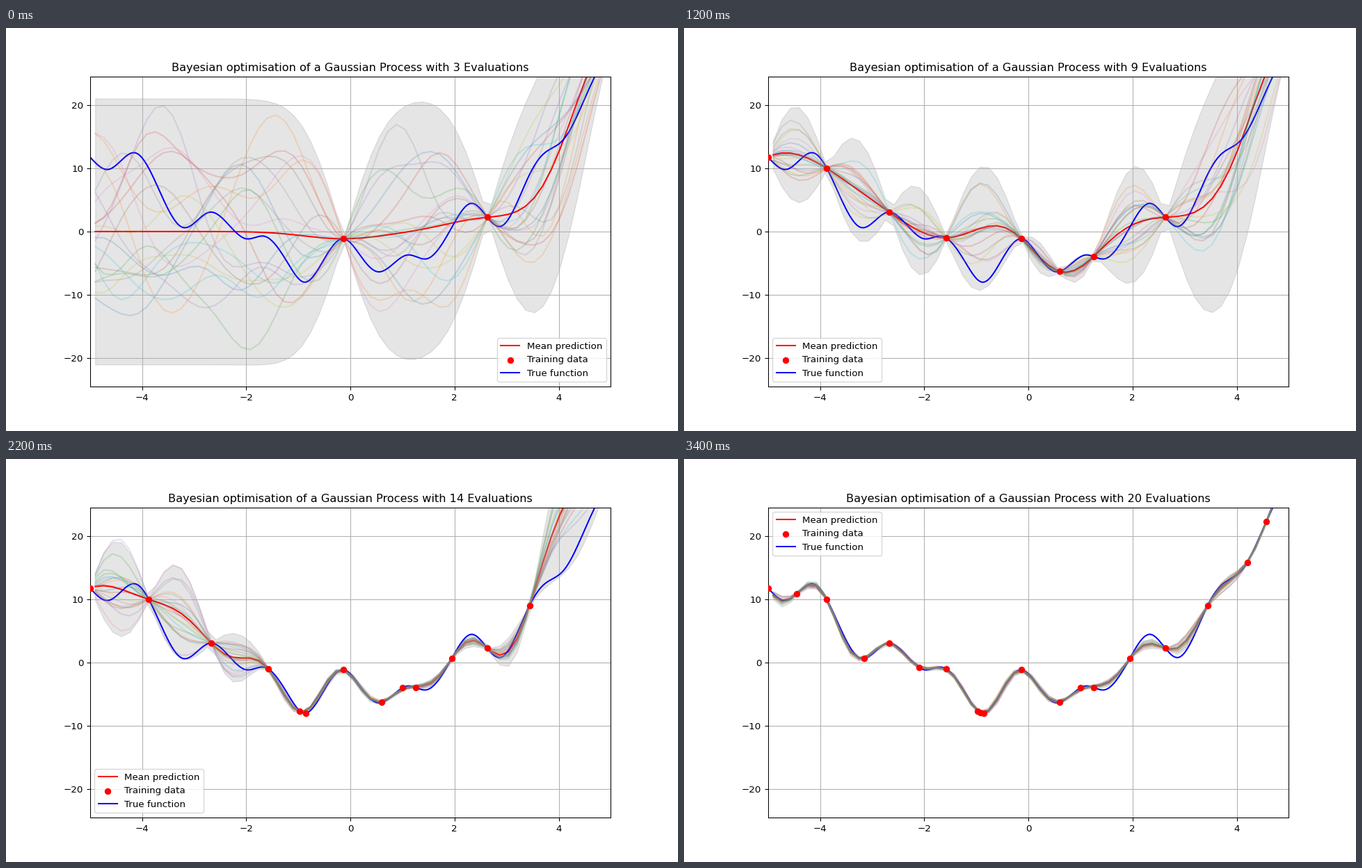
Recreate the animation shown at these times as a matplotlib script. Size 966 by 580 pixels, loop 3.6 s.

```python
import numpy as np
import matplotlib.pyplot as plt
from matplotlib.animation import FuncAnimation

WIDTH, HEIGHT, DPI = 966, 580, 96.6
FIRST, LAST = 3, 20
N_SAMPLES = 20

# Gaussian process settings
LENGTH_SCALE = 0.75
SIGMA = 7.5
NOISE = 0.1
BAND = 2.8

# Evaluation points in the order in which they are chosen
EVALS = np.array([-0.13, 2.63, 5, -1.58, -3.87, 1.25, -5, -2.67, 0.6, -0.97,
                  3.44, -0.86, 1.0, 1.95, -0.92, 4.2, -4.45, -3.16, -2.1, 4.57])

# Turning points of the true function and a few points between them
KEYS = np.array([
    (-5, 11.75), (-4.65, 9.8), (-4.12, 12.4), (-3.67, 6.5), (-3.22, 0.65),
    (-2.7, 3.05), (-2, -1.15), (-1.65, -0.75), (-1.2, -5), (-0.88, -8),
    (-0.5, -4.3), (-0.13, -1.15), (0.2, -3.9), (0.52, -6.35), (1.1, -3.7),
    (1.47, -4.3), (1.95, 0.7), (2.33, 4.45), (2.88, 0.8), (3.44, 9),
    (3.7, 12.2), (4.1, 14.6), (4.57, 22.3), (5, 29.5)])


def natural_spline(keys):
    """Natural cubic spline as a sum of |x - key|^3 plus a line."""
    kx, ky = keys.T
    line = np.column_stack([np.ones_like(kx), kx])
    system = np.block([[np.abs(kx[:, None] - kx) ** 3, line],
                       [line.T, np.zeros((2, 2))]])
    coef = np.linalg.solve(system, np.append(ky, [0, 0]))

    def evaluate(x):
        cubes = np.abs(x[:, None] - kx) ** 3
        return cubes @ coef[:-2] + coef[-2] + coef[-1] * x

    return evaluate


def kernel(a, b):
    return SIGMA ** 2 * np.exp(-0.5 * ((a[:, None] - b) / LENGTH_SCALE) ** 2)


def posterior(pts, values, x):
    """Mean and covariance at x, given the evaluated points."""
    gram = kernel(pts, pts) + NOISE ** 2 * np.eye(len(pts))
    cross = kernel(x, pts)
    weights = np.linalg.solve(gram, cross.T)
    return weights.T @ values, kernel(x, x) - cross @ weights


def sample_paths(mean, cov, seed):
    rng = np.random.default_rng(seed)
    scale, basis = np.linalg.eigh(cov)
    root = basis * np.sqrt(np.maximum(scale, 0))
    paths = rng.normal(size=(N_SAMPLES, len(mean))) @ root.T
    return mean + paths - paths.mean(axis=0)


def legend_place(n):
    if n <= 7:
        return "lower right"
    return "lower left" if n <= 16 else "upper left"


true_f = natural_spline(KEYS)
x_true = np.linspace(-5, 5, 500)
x_fit = np.linspace(-4.9, 4.85, 60)

# The small margin guards against rounding down by a pixel
size = np.array([WIDTH, HEIGHT]) / DPI + 1e-6
fig, ax = plt.subplots(figsize=size, dpi=DPI)


def draw(i):
    n = FIRST + i
    pts = EVALS[:n]
    values = true_f(pts)
    mean, cov = posterior(pts, values, x_fit)
    half = BAND * np.sqrt(np.maximum(np.diag(cov), 0))

    ax.clear()
    ax.fill_between(x_fit, mean - half, mean + half, color="tab:gray",
                    alpha=0.2, lw=1)
    ax.plot(x_fit, mean, color="red", label="Mean prediction")
    ax.scatter(pts, values, color="red", zorder=5, label="Training data")
    ax.plot(x_true, true_f(x_true), color="blue", label="True function")
    for k, path in enumerate(sample_paths(mean, cov, seed=n)):
        ax.plot(x_fit, path, color=f"C{k % 10}", alpha=0.2)

    ax.set(xlim=(-5, 5), ylim=(-24.5, 24.5),
           xticks=range(-4, 5, 2), yticks=range(-20, 21, 10))
    ax.set_title("Bayesian optimisation of a Gaussian Process "
                 f"with {n} Evaluations")
    ax.grid(True)
    ax.legend(loc=legend_place(n))
    return []


anim = FuncAnimation(fig, draw, frames=LAST - FIRST + 1, interval=200,
                     repeat=True, repeat_delay=0)
plt.show()
```
